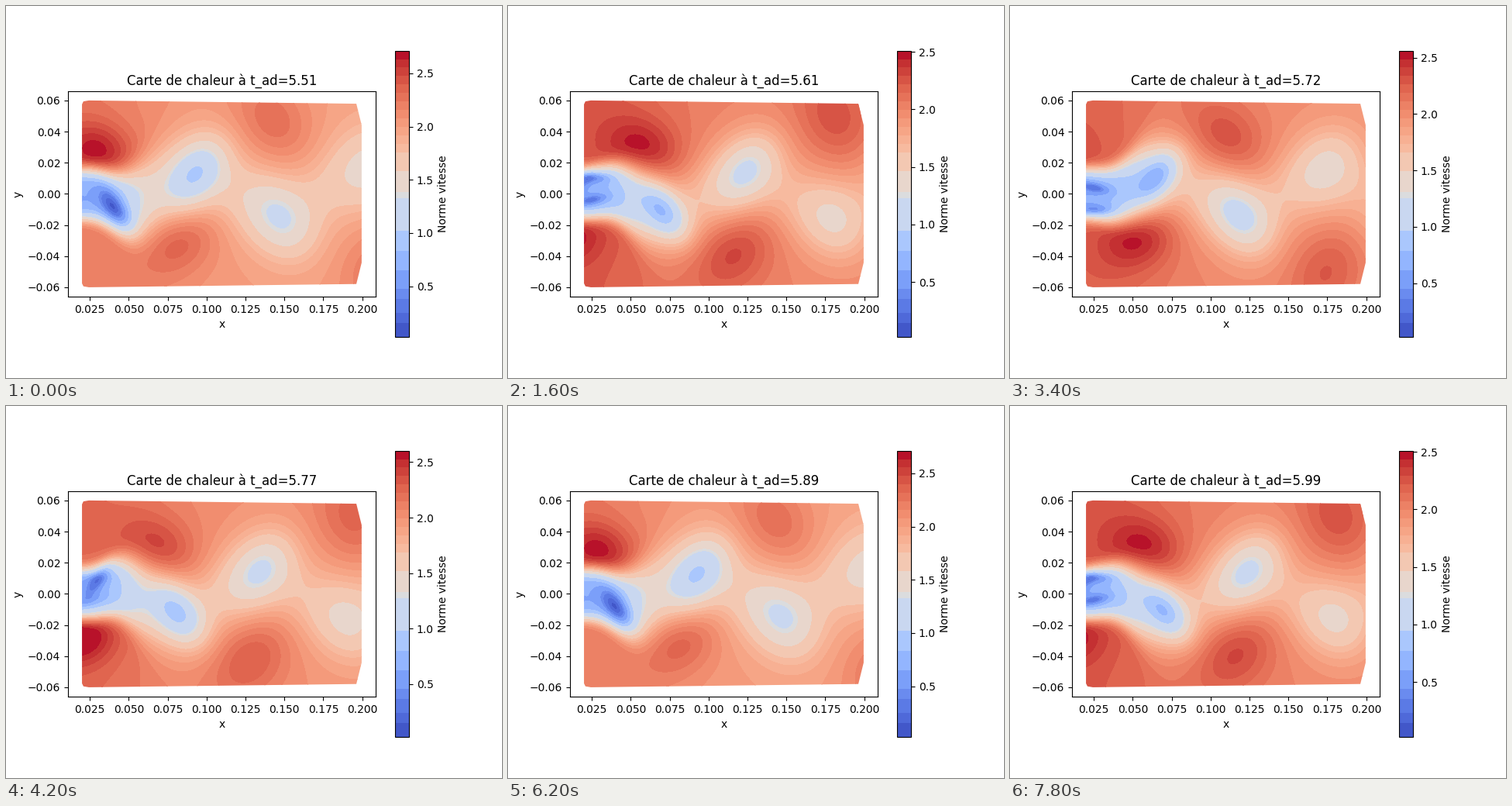
Write a matplotlib script that moves like this. It is 640 px wide and 480 px high and loops after 8000 ms.

```python
import numpy as np
import matplotlib.pyplot as plt
from matplotlib.animation import FuncAnimation
from matplotlib.cm import ScalarMappable
from matplotlib.colors import BoundaryNorm, ListedColormap
from matplotlib.patches import Polygon

FRAMES = 40
INTERVAL = 200
SHED_RATE = 5 / 31      # shedding cycles per frame
TIME_STEP = 0.0123

# Colour bands as fractions of the speed range: coarse blues, fine reds
EDGES = np.r_[0, .049, .084, .133, .168, .233, .30, .371, .485, .506, .58,
              np.linspace(.645, 1, 13)]
CMAP = ListedColormap(plt.get_cmap("coolwarm")((EDGES[1:] + EDGES[:-1]) / 2))
NORM = BoundaryNorm(EDGES, CMAP.N)

# Upper half of the measured area, mirrored below
UPPER = [(.01998, .0575), (.0209, .0594), (.0244, .06),
         (.1962, .0579), (.1996, .0442)]
OUTLINE = UPPER + [(x, -y) for x, y in reversed(UPPER)]

X, Y = np.meshgrid(np.linspace(.019, .201, 201), np.linspace(-.061, .061, 141))


def blob(x, y, long, short, tilt):
    c, s = np.cos(np.radians(tilt)), np.sin(np.radians(tilt))
    u = (X - x) * c + (Y - y) * s
    v = (Y - y) * c - (X - x) * s
    return np.exp(-(u / long) ** 2 - (v / short) ** 2)


def step(value, middle, width):
    return 1 / (1 + np.exp((middle - value) / width))


def core(age, side):
    """Slow vortex core: rolls up behind the body, drifts off and fades."""
    depth = .75 * np.exp(-.9 * age) * step(age, -.55, .1)
    x = .0925 + .106 * age + .006 * age ** 2
    y = side * (.012 + .006 * age)
    long = min(.025 + .02 * age, .027)
    short = max(.004, .016 + age * (.018 if age < 0 else .005))
    return depth * blob(x, y, long, short, side * 55)


def streaks(age, side):
    """Two thin layers of still flow while a new vortex lets go."""
    pulse = .45 * np.exp(-((age + .24) / .12) ** 2)
    return pulse * (blob(.025, side * .004, .010, .0035, -side * 12)
                    + blob(.025, -side * .0105, .011, .0035, 0))


def crest(age, side):
    """Fast patch that slides along outside the wake."""
    rise = (.28 + .19 * np.exp(-3 * age)) * step(age, -.2, .05)
    x = .029 + .1 * age + .014 * age ** 2
    y = side * min(.028 + .019 * age ** 3, .05)
    return rise * blob(x, y, .024 + .006 * age, .018 + .004 * age,
                       -side * (15 + 40 * age))


def wake(phase):
    """Meandering valley of slow flow, sharp-edged close to the body."""
    near = step(-X, -.052, .009)
    depth = .33 - 1.3 * (X - .1) + 1.2 * near
    width = .030 - .0135 * near
    swing = .013 * (1 - np.exp(-((X - .02) / .03) ** 2))
    mid = swing * np.cos(2 * np.pi * (phase - (X - .0925) / .106))
    return depth * np.exp(-(((Y - mid) / width) ** 2) ** (1 + near))


def speed(phase):
    field = 2.08 - .6 * (X - .02) + .15 * np.exp(-((X - .02) / .05) ** 2)
    field -= wake(phase)
    for j in range(-2, 4):
        age, side = phase + j / 2, 1 - 2 * (j % 2)
        field += crest(age, side) - core(age, side) - streaks(age, side)
    return field


def limits(phase):
    """Slowest and fastest speed, repeating every half cycle."""
    half = phase % .5
    low = .022 + .062 * np.exp(-((half - .032) / .014) ** 2)
    high = np.interp(half, [0, .03, .24, .29, .5],
                     [2.713, 2.602, 2.565, 2.51, 2.713])
    return low, high


fig, ax = plt.subplots(figsize=(6.4, 4.8), dpi=100)
bar = fig.colorbar(ScalarMappable(NORM, CMAP), ax=ax, spacing="proportional",
                   label="Norme vitesse")
bar.minorticks_off()
ax.set(xlim=(.01099, .20852), ylim=(-.06595, .06595), aspect="equal",
       xlabel="x", ylabel="y")
title = ax.set_title("")
mask = ax.add_patch(Polygon(OUTLINE, fc="none", ec="none"))
shown = []


def draw(n):
    while shown:
        shown.pop().remove()
    phase = n * SHED_RATE % 1
    low, high = limits(phase)
    level = np.clip((speed(phase) - low) / (high - low), .001, .999)
    bands = ax.contourf(X, Y, level, levels=EDGES, cmap=CMAP, norm=NORM)
    bands.set_clip_path(mask)
    shown.append(bands)
    ticks = np.arange(.5, 2.6, .5)
    bar.set_ticks((ticks - low) / (high - low),
                  labels=[f"{t:.1f}" for t in ticks])
    title.set_text(f"Carte de chaleur à t_ad={5.51 + n * TIME_STEP:.2f}")


anim = FuncAnimation(fig, draw, frames=FRAMES, interval=INTERVAL,
                     init_func=lambda: draw(0), repeat=True, repeat_delay=0)
plt.show()
```
